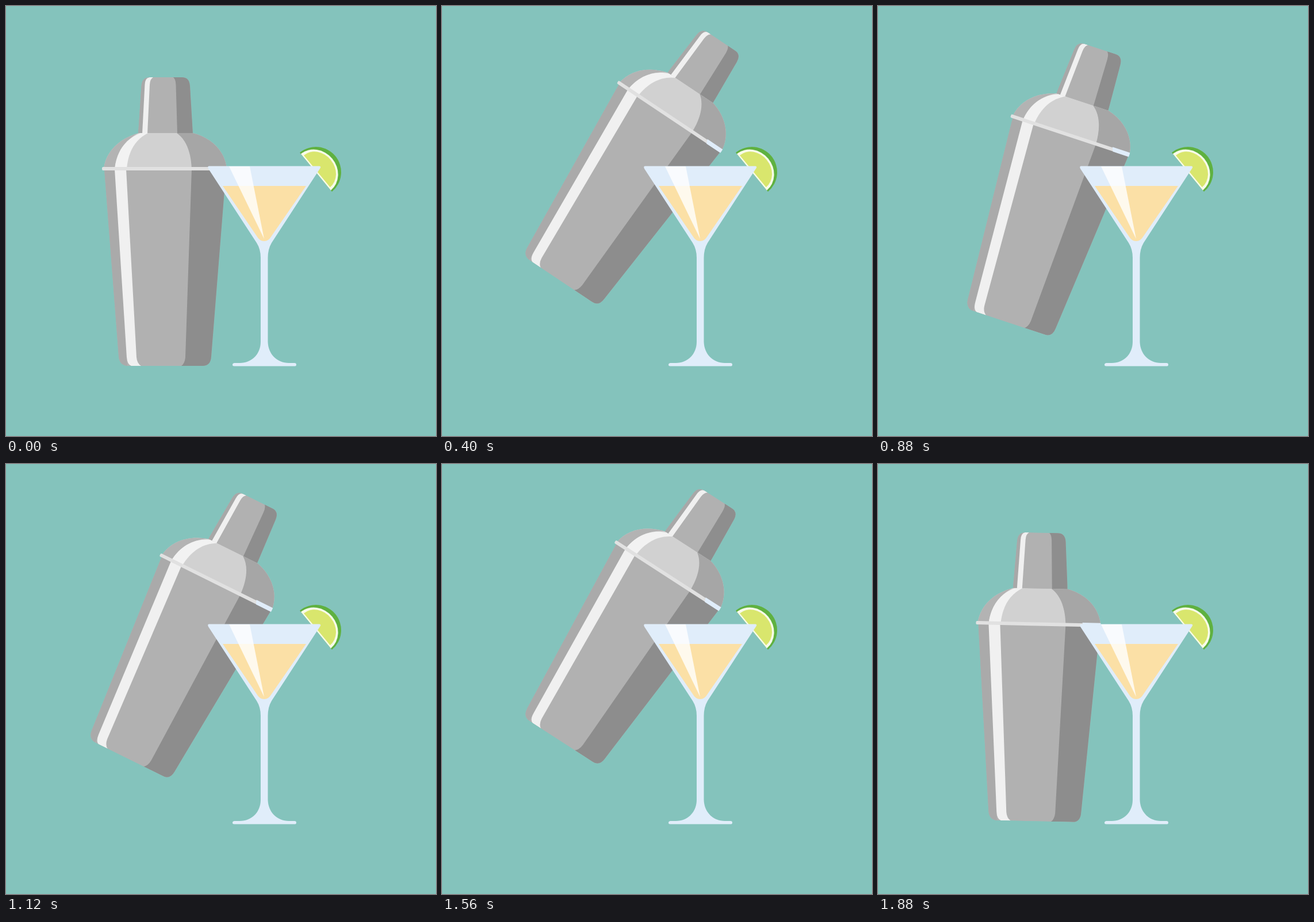
An HTML page that plays this animation: 748 by 748 pixels, repeating every 1920 ms.

```html
<!DOCTYPE html>
<html lang="en">
<head>
<meta charset="utf-8">
<title>Cocktail shaker</title>
<style>
  html, body { margin: 0; width: 100%; height: 100%; overflow: hidden; background: #84c3bc; }
  svg { display: block; width: 100vw; height: 100vh; }
</style>
</head>
<body>
<svg viewBox="0 0 748 748">
  <defs>
    <clipPath id="cap"><path d="M230 222L235.500 139Q236.500 124 250 124H306Q319 124 320 139L325 222Z"/></clipPath>
    <clipPath id="dome"><path d="M170 283C174 252 198 230 231 221H325C357 229 381 252 384 283Z"/></clipPath>
    <clipPath id="body"><path d="M171 284L196 609Q197 626 213 626H342Q356 626 357 610L383 284Z"/></clipPath>
  </defs>

  <g id="shaker">
    <g clip-path="url(#cap)">
      <path fill="#b1b1b1" d="M220 120H330V224H220Z"/>
      <path fill="#a8a8a8" d="M220 120H248Q242 126 241 137L237 224H220Z"/>
      <path fill="#f0f0f0" d="M256 124H250Q242 125 241.500 137L237 222H246L250 137Q250.500 127 256 124Z"/>
      <path fill="#8e8e8e" d="M291 124Q295 127 295.500 137L298 222H330V120Z"/>
    </g>
    <g clip-path="url(#dome)">
      <path fill="#d1d1d1" d="M165 218H390V284H165Z"/>
      <path fill="#b3b3b3" d="M165 218H236C208 231 192 253 189 284H165Z"/>
      <path fill="#f2f2f2" d="M189 284C192 253 208 231 234 221H247C225 232 212 254 210 284Z"/>
      <path fill="#a6a6a6" d="M297 221C313 232 322 254 323 284H390V218Z"/>
    </g>
    <g clip-path="url(#body)">
      <path fill="#b1b1b1" d="M165 284H390V630H165Z"/>
      <path fill="#aaa" d="M165 284H190L211 630H165Z"/>
      <path fill="#f0f0f0" d="M189 284H209L227 611Q228 622 235 626H218Q211 624 210 611Z"/>
      <path fill="#8d8d8d" d="M323 284L312 611Q311 622 305 626H390V284Z"/>
    </g>
    <rect x="167" y="280" width="217" height="6" rx="2" fill="#e1e1e1"/>
    <path fill="#e0edfa" d="M352 279H384V286.500H355Z"/>
  </g>

  <g transform="translate(539 289) rotate(50.500)">
    <path fill="#5fb140" d="M-44 0A44 44 0 0 1 44 0Z"/>
    <path fill="#f8fbe9" d="M-41 0A41 37 0 0 1 41 0Z"/>
    <path fill="#d9e66d" d="M-36 -2.500A36 31 0 0 1 36 -2.500Z"/>
  </g>

  <path fill="#e0edfa" d="M353 278.500H545Q549 279 546 283L462 412Q455.500 423 455.500 438V584C456 606 472 621 492 621H502Q505 621 505 624T502 626.500H397Q394 626.500 394 624T397 621H407C427 621 443 606 443 584V438Q443 423 436 412L352 283Q350 279 353 278.500Z"/>
  <path fill="#fbe0a6" d="M377 313H522L462 400Q457 409 449 409T436 400Z"/>
  <path fill="#fff" opacity=".8" d="M388 279H424L449 405Z"/>
</svg>
<script>
  const LOOP = 1920, STEP = 40;
  // [time in ms, tilt in degrees]
  const keys = [[0, 0], [255, 32.5], [455, 34], [740, 3.4], [1025, 34], [1310, 3.4], [1595, 34], [LOOP, 0]];
  const shaker = document.getElementById('shaker');

  function tilt(t) {
    const i = keys.findIndex(k => k[0] > t);
    const [t0, a] = keys[i - 1], [t1, b] = keys[i];
    return a + (b - a) * (1 - Math.cos(Math.PI * (t - t0) / (t1 - t0))) / 2;
  }

  function draw() {
    const t = Math.floor(performance.now() % LOOP / STEP) * STEP;
    shaker.setAttribute('transform', `rotate(${tilt(t)} 485 436.2)`);
    requestAnimationFrame(draw);
  }
  draw();
</script>
</body>
</html>
```
